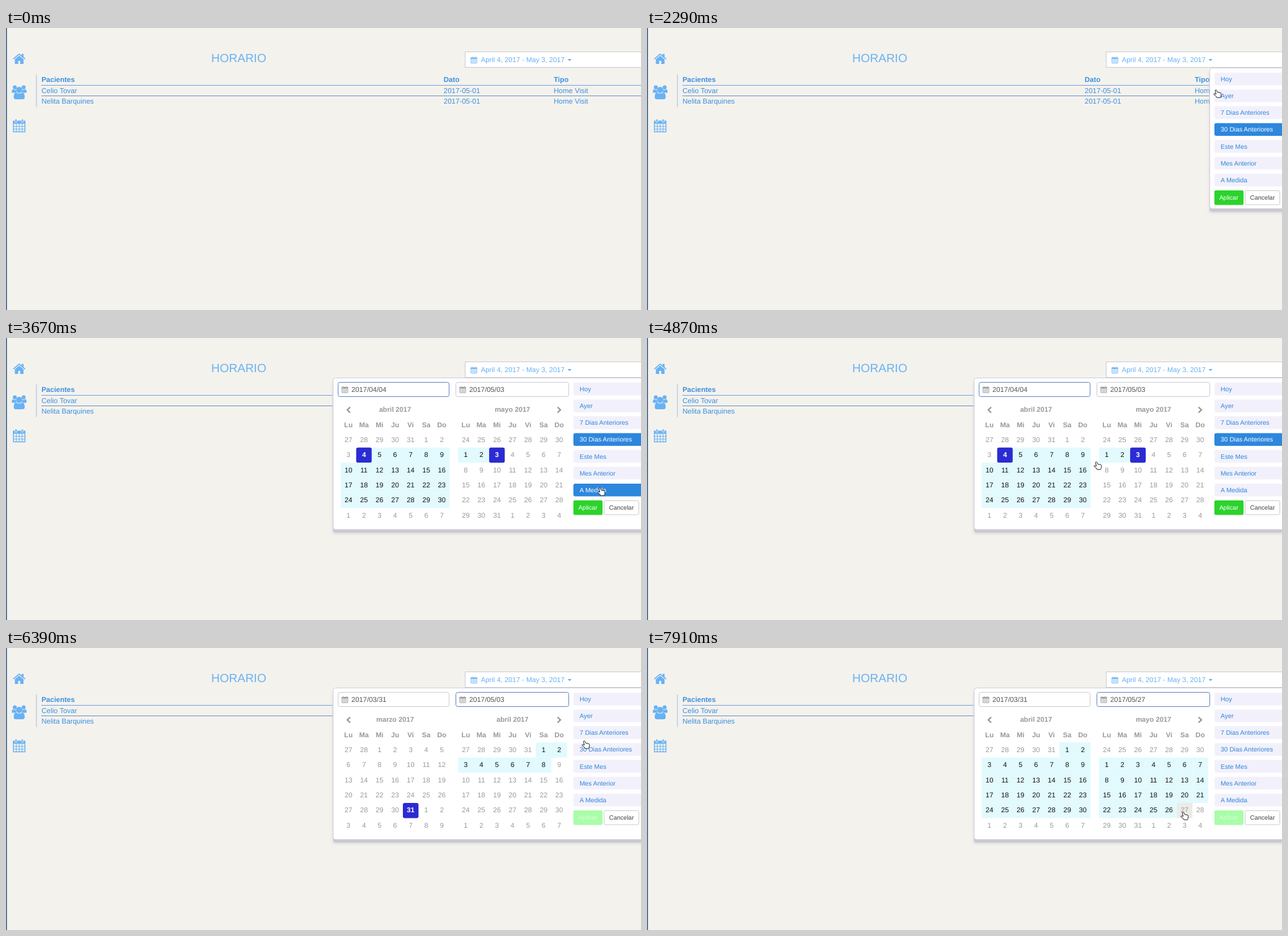
These frames come from a looping animation (1024 px wide and 455 px high, 8 s). An HTML page:

```html
<!DOCTYPE html>
<html lang="es">
<head>
<meta charset="utf-8">
<title>Horario</title>
<style>
html, body { margin: 0; width: 100%; height: 100%; overflow: hidden; background: #f4f2ed; }
svg { display: block; }
text {
  font: 11.5px "Liberation Sans", Arial, sans-serif;
  fill: #3e90e0;
  text-rendering: geometricPrecision;
  white-space: pre;
}
.bold { font-weight: bold; }
.light, .icon { fill: #68b2f4; }
.light { font-size: 11.25px; }
.title { font-size: 19px; }
.mid { text-anchor: middle; }
.cal text { font-size: 11.2px; fill: #999; text-anchor: middle; }
.cal .bold { font-weight: bold; }
.cal .in { fill: #111; }
.cal .on { fill: #fff; font-weight: bold; }
.field { fill: #fff; stroke: #cbcbd2; }
.field.focus { stroke: #5f83c6; }
.entry { font-size: 11.3px; fill: #555; }
.range rect { fill: #f2f1fb; }
.range text { font-size: 10.35px; fill: #2f86dc; }
.range.on rect { fill: #2d87dd; }
.range.on text { fill: #fff; }
.small { font-size: 10px; }
</style>
</head>
<body>
<svg id="stage" width="1024" height="455" viewBox="0 0 1024 455">
  <defs>
    <filter id="soft" x="-10%" y="-10%" width="120%" height="120%"><feGaussianBlur stdDeviation="2.5"/></filter>
    <symbol id="calendar" viewBox="0 0 22 23" overflow="visible">
      <path fill="none" stroke="currentColor" stroke-width="1.5" d="M1.5 4h19v17.5h-19z"/>
      <path fill="currentColor" d="M1 3.2h20v5H1z"/>
      <path fill="none" stroke="currentColor" stroke-width="1" d="M6.2 8v13.5M11 8v13.5M15.8 8v13.5M1.5 12.5h19M1.5 17h19"/>
      <path fill="currentColor" stroke="#f4f2ed" stroke-width=".8" d="M4.3 .6h3v5h-3zM14.7 .6h3v5h-3z"/>
    </symbol>
  </defs>

  <rect width="1024" height="455" fill="#f4f2ed"/>
  <rect width="1.4" height="455" fill="#1f4f7e"/>

  <g class="icon">
    <path d="M14.3 50.6 21.3 44.8 28.3 50.6V57.2q0 .8-.8.8H23V53H19.6V58H15.1q-.8 0-.8-.8z"/>
    <path d="M11.2 49.4 20.2 41.8Q21.3 41 22.4 41.8L25.3 44.2V41.8H28.3V46.8L31.4 49.4 30.3 50.7 21.3 43.2 12.3 50.7z"/>
    <circle cx="14.2" cy="95.8" r="3.2"/>
    <circle cx="28.4" cy="95.8" r="3.2"/>
    <path d="M9.5 104.5V102q0-3 2-3l2.6 1 2.4-.6q-.6 3 .8 5zM33.1 104.5V102q0-3-2-3l-2.6 1-2.4-.6q.6 3-.8 5z"/>
    <circle cx="21.3" cy="100" r="4.9"/>
    <path d="M12.4 111.5q0-6.8 4-7.2 4.9 3 9.8 0 4 .4 4 7.2 0 3.4-3.4 3.4h-11q-3.4 0-3.4-3.4z"/>
  </g>
  <use href="#calendar" x="10.5" y="146.5" width="21.5" height="22.5" color="#68b2f4"/>

  <text class="light title" x="331" y="54.7">HORARIO</text>
  <rect class="field" x="740.5" y="38.5" width="320" height="25"/>
  <use href="#calendar" x="749" y="46" width="11" height="11.5" color="#68b2f4"/>
  <text class="light" x="765.8" y="55">April 4, 2017 - May 3, 2017</text>
  <path class="icon" d="M905.6 50h6.4l-3.2 3.4z"/>

  <path d="M49 75V127.5" stroke="#b9d1e8" stroke-width="1.6"/>
  <path d="M57 92.5H1024" stroke="#6fa3df"/>
  <path d="M57 109.5H1024" stroke="#6590c4"/>
  <g id="table"></g>

  <g id="popup">
    <rect class="box" y="70.5" width="560" fill="#d3d0d9" filter="url(#soft)"/>
    <rect class="box" y="69.5" width="560" rx="4" fill="#cbc9d0"/>
    <rect class="box" y="64.5" width="560" rx="4" fill="#fff" stroke="#cfcddd"/>
    <g id="ranges"></g>
    <rect id="apply" x="915" y="262" width="47" height="23.5" rx="2"/>
    <text id="applyText" class="small mid" x="938.2" y="276.6">Aplicar</text>
    <rect x="964.5" y="262.5" width="56" height="22.5" rx="2" fill="#fff" stroke="#ccc"/>
    <text class="small mid" x="992.5" y="276.6" style="fill:#444">Cancelar</text>
    <g id="picker">
      <rect class="field" x="535.5" y="71.5" width="179" height="23" rx="3"/>
      <rect class="field" x="725.5" y="71.5" width="182" height="23" rx="3"/>
      <use href="#calendar" x="541" y="77.5" width="11" height="11.5" color="#909090"/>
      <use href="#calendar" x="731" y="77.5" width="11" height="11.5" color="#909090"/>
      <text class="entry" x="557" y="87"></text>
      <text class="entry" x="747" y="87"></text>
      <rect id="nextBg" x="879" y="104" width="25.3" height="24.2" rx="3" fill="#ebebe8"/>
      <path d="M555 111.5 550.5 116 555 120.5M889.5 111.5 894 116 889.5 120.5" fill="none" stroke="#999" stroke-width="2.4"/>
    </g>
  </g>

  <g id="cursor" stroke="#222" stroke-width="1" stroke-linejoin="round" fill="#fff">
    <path id="arrow" d="M.5 .5V13.2L3.5 10.5 5.7 15.5 7.8 14.6 5.6 9.7H9.8z"/>
    <path id="hand" d="M3.2 1.5Q4.6 0 5.6 1.6L6.9 4.6 11 5.2Q13 5.6 12.9 7.4L12.5 10.6 11.6 13.2H5.8L4.6 11 1.2 8.4Q.3 7.2 1.7 6.8L4.6 7.6z"/>
  </g>
</svg>

<script>
const LOOP = 8000, OPEN = 1740, EXPAND = 3670, PICK = 5380, NEXT = 6980;
const COL = 25.1, ROW = 24.4, TOP = 152.3, LEFT = [539.6, 728.9];
const MONTHS = ['enero', 'febrero', 'marzo', 'abril', 'mayo'];
const RANGES = ['Hoy', 'Ayer', '7 Dias Anteriores', '30 Dias Anteriores', 'Este Mes', 'Mes Anterior', 'A Medida'];
const $ = id => document.getElementById(id);
const day = (m, d) => Date.UTC(2017, m - 1, d) / 864e5;
const dateOf = n => new Date(n * 864e5);
const format = n => dateOf(n).toISOString().slice(0, 10).replace(/-/g, '/');

function add(parent, tag, attrs, text = '') {
  const el = document.createElementNS('http://www.w3.org/2000/svg', tag);
  for (const key in attrs) el.setAttribute(key, attrs[key]);
  el.textContent = text;
  return parent.appendChild(el);
}

[
  ['Pacientes', 'Dato', 'Tipo'],
  ['Celio Tovar', '2017-05-01', 'Home Visit'],
  ['Nelita Barquines', '2017-05-01', 'Home Visit']
].forEach((cells, r) => cells.forEach((text, c) =>
  add($('table'), 'text', { x: [57.2, 705.8, 883.3][c], y: [87, 104.7, 122.2][r], class: r ? '' : 'bold' }, text)));

const rangeTop = i => 72 + 27.15 * i;
const ranges = RANGES.map((name, i) => {
  const g = add($('ranges'), 'g', { class: 'range' });
  add(g, 'rect', { x: 915, y: rangeTop(i), width: 130, height: 20.6, rx: 3 });
  add(g, 'text', { x: 925, y: rangeTop(i) + 14 }, name);
  return g;
});

const calendars = LEFT.map(left => {
  const g = add($('picker'), 'g', { class: 'cal' });
  const mid = c => left + COL * (c + .5);
  const title = add(g, 'text', { x: mid(3), y: 119.1, class: 'bold' });
  ['Lu', 'Ma', 'Mi', 'Ju', 'Vi', 'Sa', 'Do'].forEach((name, c) =>
    add(g, 'text', { x: mid(c), y: 143.5, class: 'bold' }, name));
  const cells = Array.from({ length: 42 }, (_, i) => {
    const c = i % 7, r = Math.floor(i / 7);
    return {
      bg: add(g, 'rect', { x: left + c * COL, y: TOP + r * ROW, width: COL + .1, height: ROW + .1 }),
      label: add(g, 'text', { x: mid(c), y: TOP + (r + .5) * ROW + 3.3 })
    };
  });
  return { title, cells };
});

// Pointer track: time, x, y
const TRACK = [
  [920, 884, 111], [1340, 900, 66], [1540, 897, 56],
  [2210, 897, 56], [2450, 945, 184],
  [2770, 945, 184], [3010, 953, 207], [3380, 953, 241],
  [4130, 953, 241], [4250, 880, 254], [4370, 787, 231],
  [4590, 787, 231], [5170, 648, 164],
  [5380, 648, 164], [5430, 668, 168], [5860, 852, 235], [5900, 854, 235],
  [6050, 854, 235], [6210, 928, 149],
  [6390, 928, 149], [6830, 890, 118],
  [7130, 890, 119], [7310, 890, 119], [7910, 860, 264], [LOOP, 860, 264]
];

function pointerAt(t) {
  const i = TRACK.findIndex(k => k[0] > t);
  if (i < 1) return { x: 884, y: 111 };
  const [a, b] = [TRACK[i - 1], TRACK[i]];
  const p = Math.floor((t - a[0]) / 40) * 40 / (b[0] - a[0]);
  return { x: Math.round(a[1] + (b[1] - a[1]) * p), y: Math.round(a[2] + (b[2] - a[2]) * p) };
}

// The grid always starts with at least one day of the month before
const firstCell = m => day(m, 1) - ((dateOf(day(m, 1)).getUTCDay() + 6) % 7 || 7);

function hoveredDay(t, x, y, months) {
  if (t < EXPAND || t >= PICK && t < 5420) return null;
  if (t >= 5420 && t < 5900) return day(3, 4);
  const r = Math.floor((y - TOP) / ROW);
  for (let k = 0; k < 2; k++) {
    const c = Math.floor((x - LEFT[k]) / COL);
    if (c >= 0 && c < 7 && r >= 0 && r < 6) return firstCell(months[k]) + r * 7 + c;
  }
  return null;
}

// A date can show in both months, so only the cell under the pointer is shaded
function atPointer(k, t, x) {
  if (t >= PICK && t < 5900) return k === 0;
  return (x >= LEFT[1]) === (k === 1);
}

function drawPicker(t, x, y) {
  const picked = t >= PICK;
  const months = picked && t < NEXT ? [3, 4] : [4, 5];
  const start = picked ? day(3, 31) : day(4, 4);
  const hover = hoveredDay(t, x, y, months);
  const kept = t >= 5900 && t < NEXT ? day(4, 9) : 0;
  const end = picked ? hover || kept : day(5, 3);

  calendars.forEach((cal, k) => {
    const m = months[k], first = firstCell(m);
    cal.title.textContent = MONTHS[m - 1] + ' 2017';
    cal.cells.forEach(({ bg, label }, i) => {
      const n = first + i, date = dateOf(n);
      const own = date.getUTCMonth() === m - 1;
      const on = own && (n === start || !picked && n === end);
      const inside = own && n > start && n < end;
      label.textContent = date.getUTCDate();
      label.setAttribute('class', on ? 'on' : inside ? 'in' : '');
      bg.setAttribute('fill', on ? '#2b2bd2' : n === hover && atPointer(k, t, x) ? '#ebebe8' : inside ? '#e2fafd' : 'none');
      bg.setAttribute('rx', on ? 3 : 0);
    });
  });

  const [from, to] = document.querySelectorAll('.entry');
  from.textContent = format(picked ? start : hover || start);
  to.textContent = format(picked && hover || day(5, 3));
  document.querySelectorAll('#picker .field').forEach((f, i) => f.classList.toggle('focus', picked === (i === 1)));
  $('nextBg').style.display = t > 6210 && x > 879 && x < 904.3 && y > 104 && y < 128.2 ? '' : 'none';
}

function draw(t) {
  const { x, y } = pointerAt(t);
  const hx = x + 4;
  const hand = t > 1340 && y < 64 || t >= OPEN;
  $('cursor').style.display = t < 920 ? 'none' : '';
  $('cursor').setAttribute('transform', `translate(${x} ${y})`);
  $('arrow').style.display = hand ? 'none' : '';
  $('hand').style.display = hand ? '' : 'none';

  const wide = t >= EXPAND, picked = t >= PICK;
  $('popup').style.display = t < OPEN ? 'none' : '';
  $('picker').style.display = wide ? '' : 'none';
  if (t < OPEN) return;
  document.querySelectorAll('.box').forEach(b => {
    b.setAttribute('x', wide ? 527.5 : 907.5);
    b.setAttribute('height', wide ? 244.5 : 227);
  });
  ranges.forEach((g, i) => {
    const over = hx >= 915 && y >= rangeTop(i) && y <= rangeTop(i) + 20.6;
    g.classList.toggle('on', over || i === 3 && !picked);
  });
  $('apply').setAttribute('fill', picked ? '#a9fda9' : '#2cd32c');
  $('applyText').style.fill = picked ? '#d9ffd9' : '#fff';
  if (wide) drawPicker(t, hx, y);
}

function tick(now) {
  draw(now % LOOP);
  requestAnimationFrame(tick);
}
draw(0);
requestAnimationFrame(tick);
</script>
</body>
</html>
```
